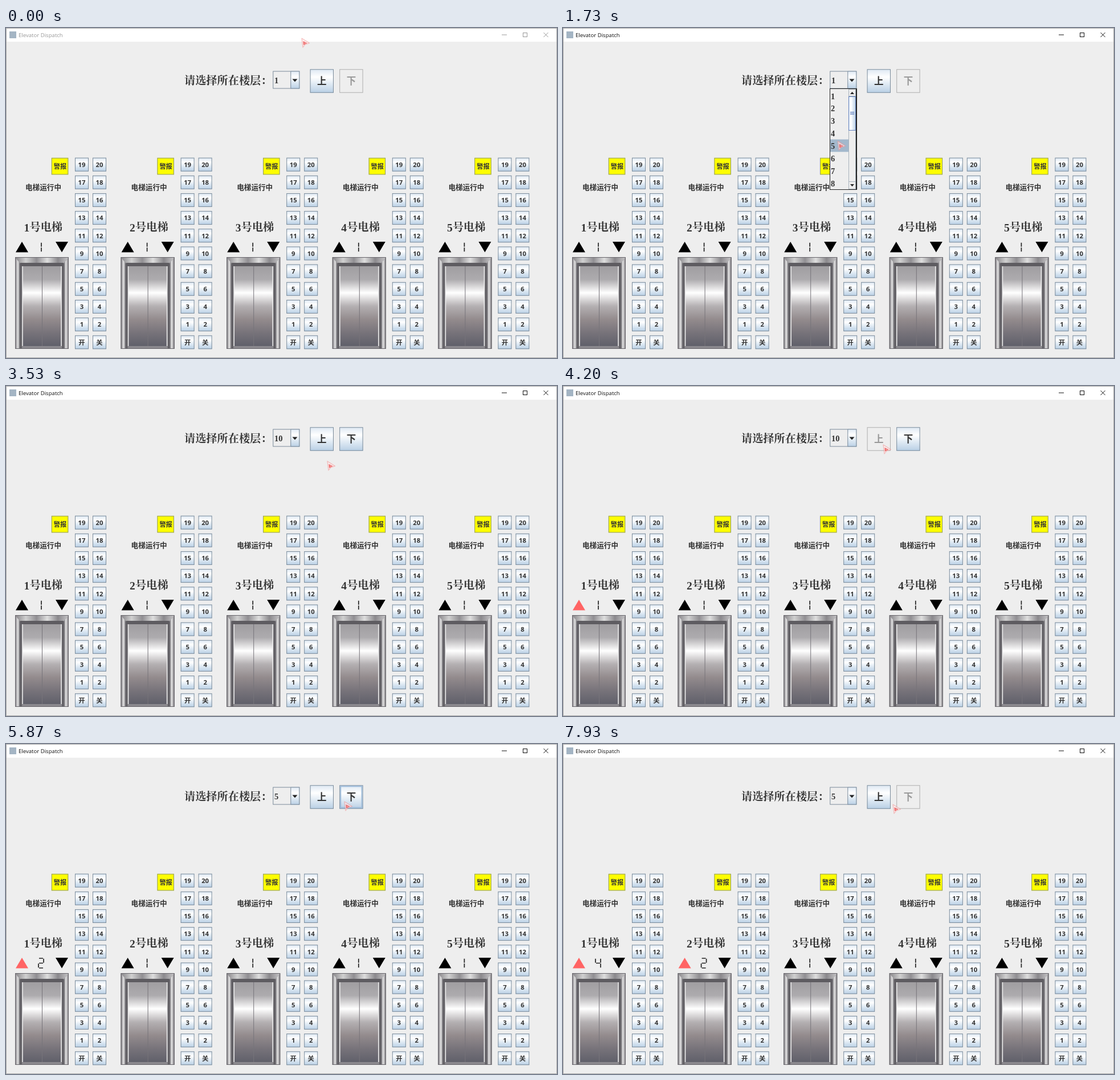
These frames come from a looping animation (967 px wide and 579 px high, 8 s). An HTML page with a canvas:

```html
<!DOCTYPE html>
<html lang="zh-CN">
<head>
<meta charset="utf-8">
<style>
html, body { margin: 0; width: 100%; height: 100%; overflow: hidden; background: #eee; }
canvas { display: block; }
</style>
</head>
<body>
<canvas id="stage" width="967" height="579"></canvas>
<script>
const g = document.getElementById('stage').getContext('2d');
const LOOP = 8000;
const CJK = '"Noto Sans CJK SC", "Noto Sans CJK JP", "Noto Sans CJK", sans-serif';
const SANS = '"Open Sans", ' + CJK;
const SERIF = '"Liberation Serif", "Noto Serif CJK SC", ' + CJK;
const BLUE = ['#dde8f3', '#fff', '#dbe7f2', '#b8cfe5'];
const STEEL = ['#a09ea1', '#adabae', '#fff', '#b4b0b2', '#938b8d', '#77737a', '#60606a'];
const JAMB = ['#6f6d72', '#b5b3b6', '#e4e4e4', '#77757a', '#59575c', '#939196'];
const LINTEL = ['#858387', '#d0d0d0', '#918f93', '#dedede', '#8b898d', '#c8c7c9'];
const ROW = 21.87, LIST_Y = 108, TOP = 41.4;

// Pointer moves: start, end, x and y reached
const MOVES = [
  [70, 400, 501, 84], [1210, 1870, 476, 229], [2070, 2400, 477, 266], [2860, 2930, 477, 247],
  [3130, 3530, 563, 132], [3530, 3930, 561, 103], [4470, 4730, 510, 97], [4870, 5330, 478, 138],
  [5470, 5870, 593, 101], [6270, 6530, 589, 103], [7200, 7930, 578, 106]
];

function pointer(t) {
  let x = 518, y = 18;
  for (const [start, end, toX, toY] of MOVES) {
    const k = Math.min(1, Math.max(0, (t - start) / (end - start)));
    x += (toX - x) * k;
    y += (toY - y) * k;
  }
  return [x, y];
}

// Evenly spaced gradient
function ramp(x0, y0, x1, y1, colors) {
  const r = g.createLinearGradient(x0, y0, x1, y1);
  colors.forEach((c, i) => r.addColorStop(i / (colors.length - 1), c));
  return r;
}

function rect(x, y, w, h, fill, line) {
  g.fillStyle = fill;
  g.fillRect(x, y, w, h);
  if (line) {
    g.strokeStyle = line;
    g.lineWidth = 1;
    g.strokeRect(x + .5, y + .5, w - 1, h - 1);
  }
}

function poly(fill, ...pts) {
  g.beginPath();
  for (let i = 0; i < pts.length; i += 2) g.lineTo(pts[i], pts[i + 1]);
  g.closePath();
  g.fillStyle = fill;
  g.fill();
}

function lines(color, width, ...segs) {
  g.strokeStyle = color;
  g.lineWidth = width;
  g.beginPath();
  for (const [a, b, c, d] of segs) { g.moveTo(a, b); g.lineTo(c, d); }
  g.stroke();
}

// y is the vertical centre of the glyphs
function text(s, x, y, size, font, weight = 700, color = '#333', align = 'left') {
  g.font = `${weight} ${size}px ${font}`;
  g.textAlign = align;
  g.fillStyle = color;
  g.fillText(s, x, y + size * .36);
}

function button(s, x, y, side, size, on = true, hover = false) {
  rect(x, y, side, side, on ? ramp(0, y, 0, y + side, BLUE) : '#eee', on ? '#7a8a99' : '#adadad');
  if (hover) {
    g.strokeStyle = '#9dbbd9';
    g.lineWidth = 2;
    g.strokeRect(x + 2, y + 2, side - 4, side - 4);
  }
  text(s, x + side / 2, y + side / 2 + .3, size, SANS, 700, on ? '#333' : '#999', 'center');
}

function titleBar(active) {
  const c = active ? '#111' : '#999';
  rect(0, 0, 967, 24, '#fff');
  rect(6, 6, 12, 12, '#a4b5c4');
  text('Elevator Dispatch', 22, 12.3, 9.6, SANS, 400, c);
  lines(c, 1, [870, 12, 879, 12], [943.5, 8, 951.5, 16], [951.5, 8, 943.5, 16]);
  g.strokeRect(907.5, 8.5, 7, 7);
}

// Lit segments of each digit, clockwise from the top, the middle bar last
const LIT = { 1: '12', 2: '01346', 3: '01236', 4: '1256' };

function digit(n, cx, y) {
  const w = 9, half = 8.5, x = cx - (n === 1 ? w : w / 2 + .5);
  lines('#222', 1.7, ...[...LIT[n]].map(Number).map(i => {
    if (i % 3 === 0) {
      const barY = y + half * (i / 3 * 2 % 3);
      return [x + 1, barY, x + w - 1, barY];
    }
    const sideX = i < 3 ? x + w : x, sideY = i % 2 ? y : y + half;
    return [sideX, sideY + .8, sideX, sideY + half - .8];
  }));
}

function door(x, y) {
  const w = 94, h = 161, depth = 13;
  const left = x + depth, right = x + w - depth, top = y + 16, end = y + 156;
  rect(x, y, w, h, '#8b898e');
  poly(ramp(x, 0, left, 0, JAMB), x, y, left, top, left, y + h, x, y + h);
  poly(ramp(x + w, 0, right, 0, JAMB), x + w, y, right, top, right, y + h, x + w, y + h);
  poly(ramp(x, 0, x + w, 0, LINTEL), x, y, x + w, y, right, top, left, top);
  rect(x + 9, y + 10, w - 18, 6, '#5e5c61');
  rect(left, top, right - left, end - top, ramp(0, top, 0, end, STEEL));
  lines('#eee', 1.5, [left, top, left, end], [right, top, right, end]);
  lines('#77747a', 1, [x + w / 2 + .5, top, x + w / 2 + .5, end]);
  g.strokeStyle = '#66646a';
  g.strokeRect(x + .5, y + .5, w - 1, h - 1);
}

function elevator(i, floor, rising) {
  g.save();
  g.translate(185.6 * i, 0);
  rect(79.8, 227.8, 29.5, 29.5, '#ff0', '#8d9770');
  text('警报', 95, 243, 11.2, CJK, 700, '#333', 'center');
  text('电梯运行中', 65.5, 279.5, 12.6, CJK, 700, '#333', 'center');
  text(i + 1, 31.5, 349.5, 19.5, SERIF);
  text('号电梯', 41.5, 349, 19.2, SERIF, 600);
  poly(rising ? '#ff6464' : '#000', 28, 375, 39, 393.5, 17, 393.5);
  poly('#000', 87, 375, 109, 375, 98, 393.5);
  digit(floor, 62, 376);
  door(16, 402);
  for (let r = 0; r < 11; r++) {
    const y = 227.6 + 31.17 * r, n = 19 - 2 * r;
    button(r < 10 ? n : '开', 121, y, 24, 11.3);
    button(r < 10 ? n + 1 : '关', 152, y, 24, 11.3);
  }
  g.restore();
}

function combo(value, pressed) {
  rect(468.3, 75.5, 47, 31, '#eee', '#7a8a99');
  text(value, 471, 91.3, 14.5, SERIF);
  rect(499.3, 75.5, 16, 31, pressed ? '#a3bdd8' : ramp(0, 75, 0, 107, BLUE), '#7a8a99');
  poly('#222', 502.5, 89.5, 511.5, 89.5, 507, 94.5);
}

function popup(scroll, value, px, py) {
  rect(468, 106, 48, 178, '#eee', '#222');
  rect(514, 107, 2, 177, '#222');
  const row = Math.floor((py - LIST_Y) / ROW);
  const chosen = px < 501 && row >= 0 && row < 8 ? row : value - 1 - scroll;
  if (chosen >= 0 && chosen < 8) rect(469, LIST_Y + chosen * ROW, 32, ROW, '#a3b8cc');
  for (let r = 0; r < 8; r++) text(r + 1 + scroll, 470, 119.3 + r * ROW, 14.5, SERIF);
  for (const [y, h] of [[107, 176], [107, 13], [269, 14]]) rect(501, y, 13, h, '#eee', '#a9b3bd');
  poly('#222', 504, 116, 511, 116, 507.5, 112);
  poly('#222', 504, 274, 511, 274, 507.5, 278);
  const y = 120 + Math.round(scroll * 7.4);
  rect(501, y, 13, 60, ramp(501, 0, 514, 0, BLUE), '#6382bf');
  for (let d = 27.5; d < 32; d += 2) lines('#6382bf', 1, [504, y + d, 511, y + d]);
}

function arrow(x, y) {
  g.save();
  g.translate(x, y);
  g.lineJoin = 'round';
  poly('rgba(255,235,235,.6)', 1, 0, 14.5, 8.5, 7, 11, 3, 16);
  g.strokeStyle = 'rgba(240,140,140,.55)';
  g.lineWidth = 1.2;
  g.stroke();
  poly('rgba(236,74,74,.8)', 3.5, 5, 10.5, 8.5, 4, 12);
  rect(5.5, 7.8, 2.2, 1.5, '#f7b4b4');
  g.restore();
}

function draw(t) {
  const [px, py] = pointer(t);
  const within = (a, b) => t >= a && t < b;
  const choice = (s, x, on) => {
    const hover = px >= x && px < x + TOP && py >= 72 && py < 72 + TOP;
    button(s, x, 72.3, TOP, 16.5, on, on && hover);
  };
  const value = t < 3130 ? 1 : t < 5470 ? 10 : 5;

  rect(0, 0, 967, 579, '#eee');
  titleBar(t >= 600);
  text('请选择所在楼层：', 313, 92, 19.2, SERIF, 600);
  combo(value, within(600, 670) || within(4870, 4940));
  choice('上', 533.6, !within(4130, 5470));
  choice('下', 585.2, within(3130, 6130));

  // Each called car climbs one floor about every second
  const calls = [4200, 6200];
  for (let i = 0; i < 5; i++) {
    const rising = t >= calls[i];
    elevator(i, rising ? 1 + Math.floor((t - calls[i]) / 1000) : 1, rising);
  }
  if (within(670, 3130) || within(4870, 5470)) popup(t < 1800 ? 0 : 3, value, px, py);
  g.strokeStyle = '#aaa';
  g.lineWidth = 1;
  g.strokeRect(.5, .5, 966, 578);
  arrow(px, py);
}

function tick() {
  draw(performance.now() % LOOP);
  requestAnimationFrame(tick);
}
tick();
</script>
</body>
</html>
```
